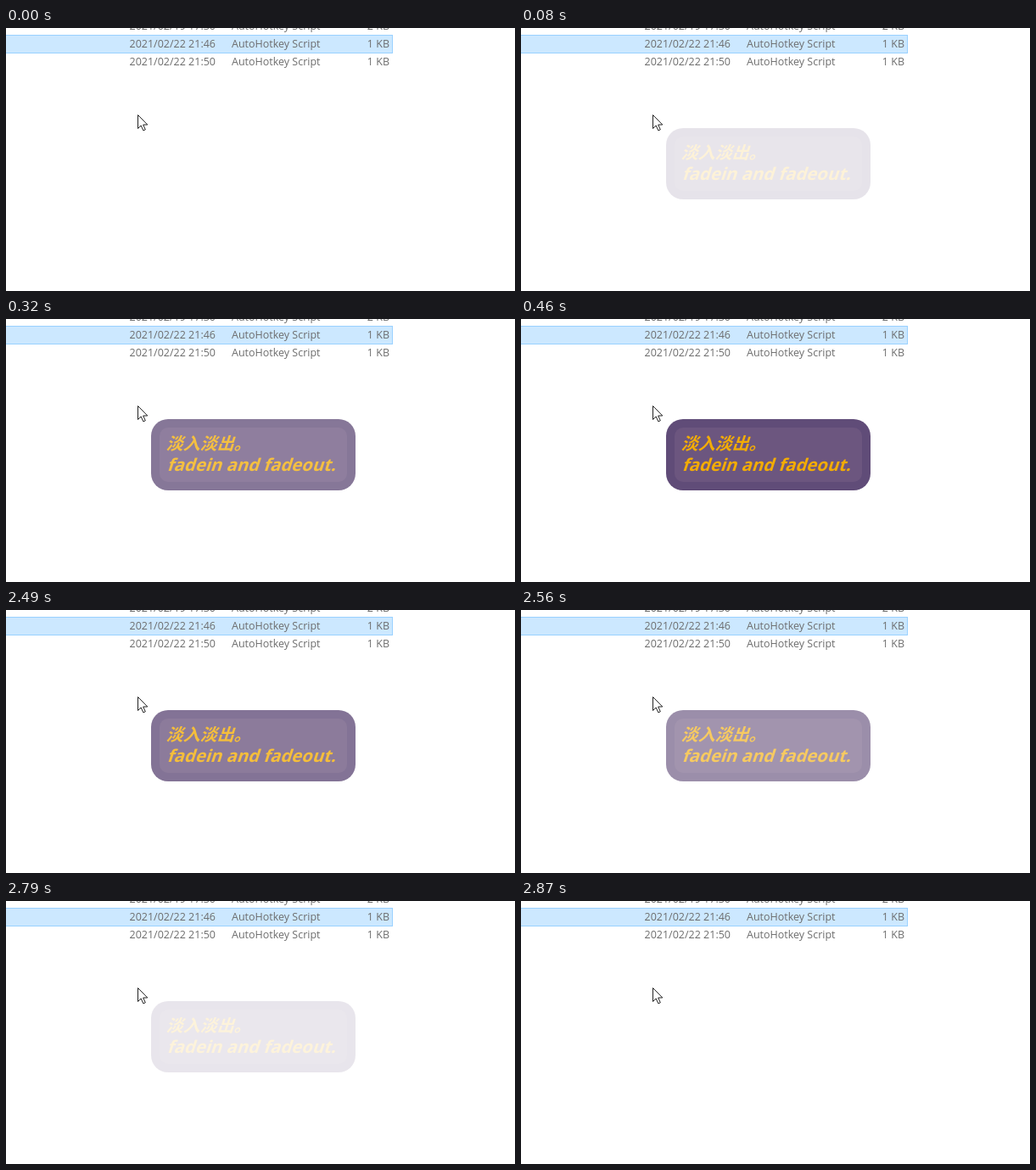
These frames come from a looping animation (600x310 px, 4.11 s). An HTML page:

```html
<!DOCTYPE html>
<html lang="zh-CN">
<head>
<meta charset="utf-8">
<title>Fade in and fade out</title>
<style>
  html, body { margin: 0; width: 100%; height: 100%; overflow: hidden; background: #fff; }
  svg { display: block; }
  .files { font: 12.5px "Open Sans", "Noto Sans", sans-serif; fill: #6d6d6d; }
  .size { text-anchor: end; }
  .tip { opacity: 0; animation: fade 4110ms step-end infinite; }
  .tip text {
    font: bold 20.3px "Open Sans", "Noto Sans", sans-serif;
    fill: #f3ac04;
  }
  .tip .cjk { font: bold 20px "Noto Sans CJK SC", "Noto Sans CJK", "Noto Sans CJK JP", sans-serif; }
  @keyframes fade {
    0% { opacity: 0; }
    1.945% { opacity: .15; }
    4.135% { opacity: .38; }
    6.325% { opacity: .61; }
    7.785% { opacity: .76; }
    9.488% { opacity: .93; }
    11.191% { opacity: 1; }
    60.583% { opacity: .78; }
    62.286% { opacity: .63; }
    64.233% { opacity: .46; }
    65.936% { opacity: .315; }
    67.882% { opacity: .14; }
    69.829%, 100% { opacity: 0; }
  }
</style>
</head>
<body>
<svg width="600" height="310" viewBox="0 0 600 310">
  <rect x="-1.5" y="8.5" width="457" height="21" fill="#cce8ff" stroke="#99d1ff"/>
  <g class="files">
    <text x="145.5" y="2">2021/02/19 17:30</text>
    <text x="266" y="2">AutoHotkey Script</text>
    <text class="size" x="452" y="2">2 KB</text>
    <text x="145.5" y="23">2021/02/22 21:46</text>
    <text x="266" y="23">AutoHotkey Script</text>
    <text class="size" x="452" y="23">1 KB</text>
    <text x="145.5" y="44">2021/02/22 21:50</text>
    <text x="266" y="44">AutoHotkey Script</text>
    <text class="size" x="452" y="44">1 KB</text>
  </g>
  <g class="tip">
    <rect x="171" y="118" width="241" height="84" rx="20" fill="#604c78"/>
    <rect x="181" y="128" width="221" height="64" rx="10" fill="#6c567f"/>
    <text class="cjk" transform="translate(188.5 154) skewX(-18)">淡入淡出。</text>
    <text transform="translate(189.5 179) skewX(-18)">fadein and fadeout.</text>
  </g>
  <path d="M155.5 102.5V118.5L159.2 115L161.8 120.8L164.3 119.8L161.7 114H166.8Z" fill="#fff" stroke="#222"/>
</svg>
</body>
</html>
```
